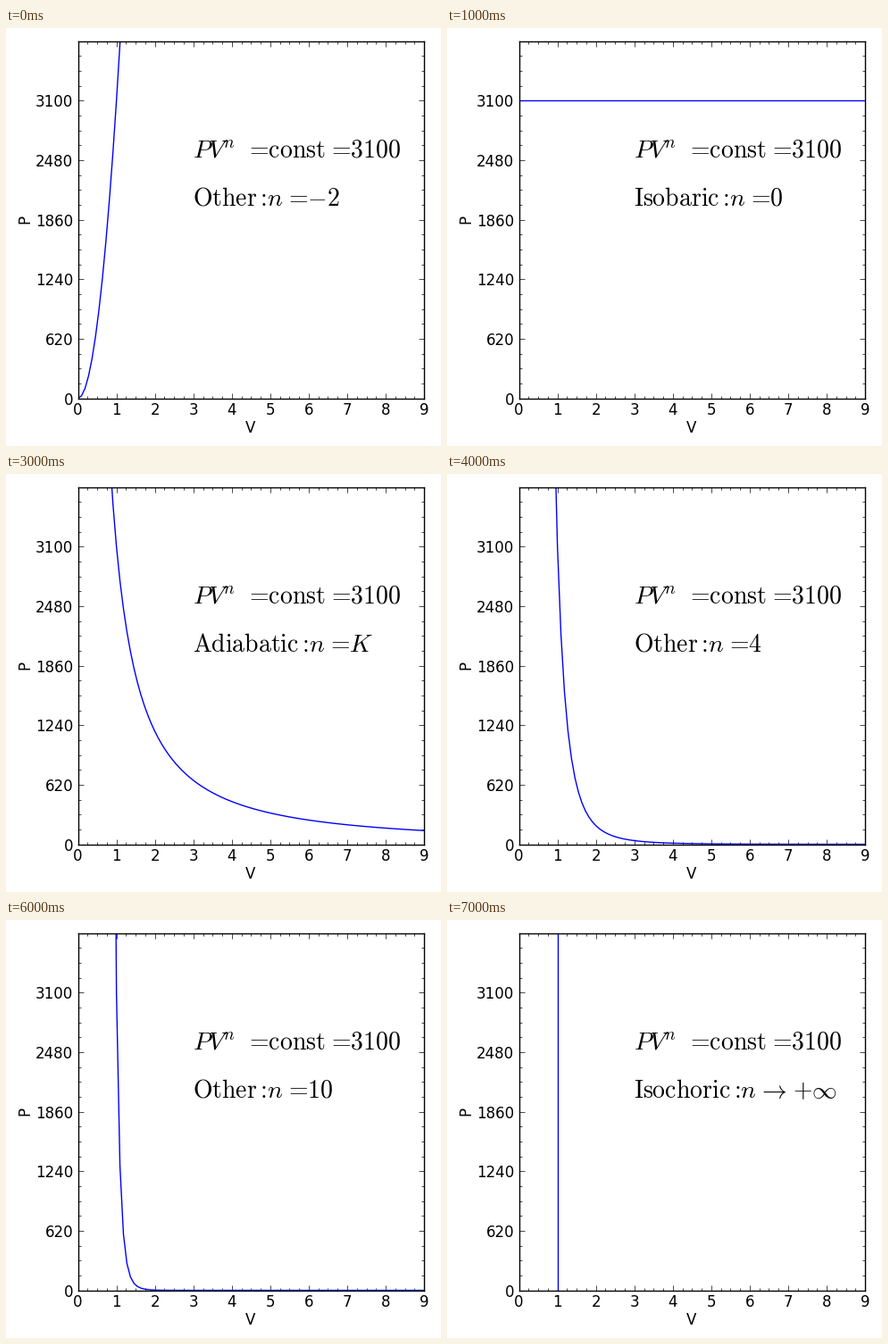
A matplotlib script that plays this animation: 487x468 px, repeating every 8000 ms.

```python
import numpy as np
import matplotlib.pyplot as plt
from matplotlib.animation import FuncAnimation
from matplotlib.ticker import AutoMinorLocator, MultipleLocator

W, H, DPI = 487, 468, 100
CONST = 3100
STEP_MS = 1000

plt.rcParams.update({
    "font.family": "DejaVu Sans",
    "font.size": 12,
    "mathtext.fontset": "cm",
    "axes.linewidth": 1.0,
})


def op(sym):
    """Math operator with space on its left side only."""
    return rf"\hspace{{0.08}}{sym}\hspace{{-0.2}}"


EQ = op("=")

# (process name, exponent, exponent as shown)
STAGES = [
    ("Other", -2, EQ + "{-}2"),
    ("Isobaric", 0, EQ + "0"),
    ("Isothermal", 1, EQ + "1"),
    ("Adiabatic", 1.4, EQ + "K"),
    ("Other", 4, EQ + "4"),
    ("Other", 7, EQ + "7"),
    ("Other", 10, EQ + "10"),
    ("Isochoric", np.inf, op(r"\to") + op("+") + r"\infty"),
]

fig = plt.figure(figsize=(W / DPI, H / DPI), dpi=DPI, facecolor="white")
ax = fig.add_axes([80.6 / W, 53.4 / H, 387.5 / W, 400 / H])
ax.set_xlim(0, 9)
ax.set_ylim(0, 1.2 * CONST)

ax.xaxis.set_major_locator(MultipleLocator(1))
ax.yaxis.set_major_formatter("{x:.0f}")
# the top edge carries no label
ax.set_yticks(np.arange(6) * CONST / 5)
for axis in (ax.xaxis, ax.yaxis):
    axis.set_minor_locator(AutoMinorLocator(4))
ax.tick_params(which="both", direction="in", top=True, right=True, width=0.5)
ax.tick_params(which="major", length=4, pad=4)
ax.tick_params(which="minor", length=2)
ax.tick_params(axis="x", pad=3)

fig.text(273.5 / W, 1 - 448 / H, "V", ha="center", va="center")
fig.text(21 / W, 1 - 214 / H, "P", ha="center", va="center", rotation=90)

law = rf"PV^{{\!n}}\hspace{{0.36}}{EQ}\mathrm{{const}}{EQ}{CONST}"
ax.text(2.99, 2512, f"${law}$", size=20)
label = ax.text(2.99, 2008, "", size=20)
curve, = ax.plot([], [], color="blue", lw=1)

volume = np.linspace(0, 9, 100)


def polytrope(n):
    if np.isinf(n):
        return [1, 1], [0, 1.2 * CONST]
    v = volume[1:] if n > 0 else volume
    return v, CONST * v ** float(-n)


def draw(i):
    name, n, shown = STAGES[i % len(STAGES)]
    curve.set_data(*polytrope(n))
    label.set_text(rf"$\mathrm{{{name}:}}\hspace{{-0.2}}n{shown}$")
    return curve, label


anim = FuncAnimation(fig, draw, frames=len(STAGES), interval=STEP_MS,
                     repeat=True, repeat_delay=0)
plt.show()
```
